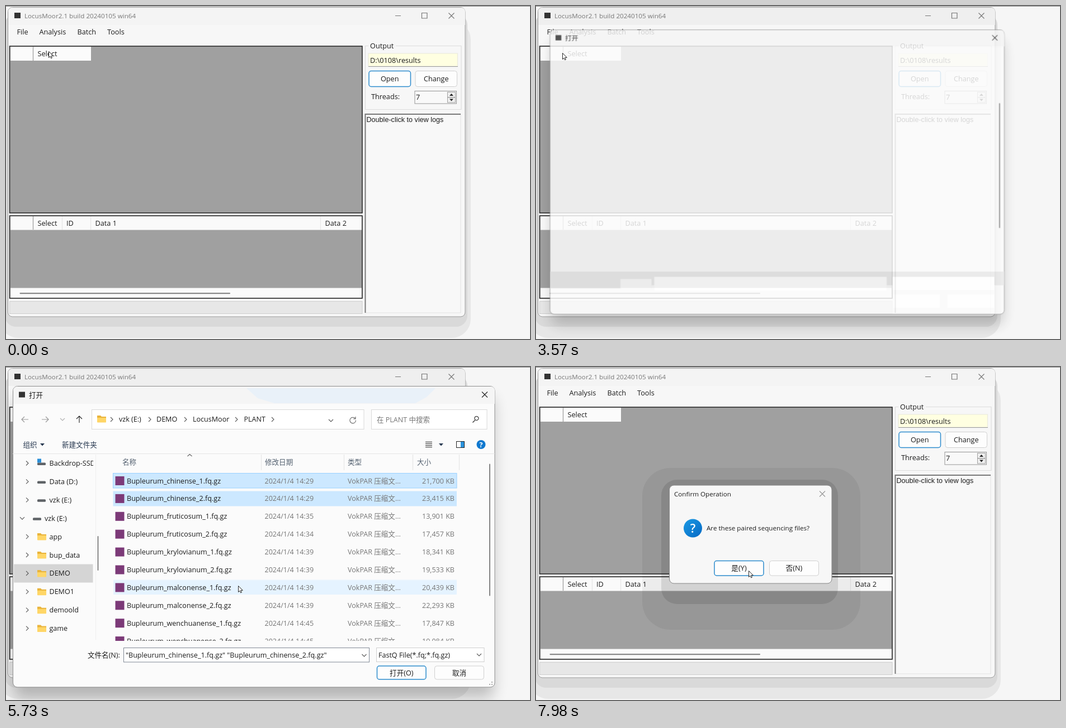
An HTML page for the animation above (8000 ms loop, 937x597 px).

```html
<!DOCTYPE html>
<html lang="en">
<head>
<meta charset="utf-8">
<title>Loading paired sequencing files</title>
<style>
html, body { margin: 0; width: 100%; height: 100%; overflow: hidden; background: #f6f6f6; }
svg { display: block; width: 937px; height: 597px; }
text { font: 12.7px 'Open Sans', 'Noto Sans CJK SC', sans-serif; fill: #1c1c1c; white-space: pre; }
.cap { font-size: 11.65px; }
.log { font: 12.6px 'Liberation Sans', sans-serif; }
#dialog text { font-size: 12.55px; }
#dialog .dim { fill: #767676; }
#dialog .head { fill: #53606f; }
#dialog .tool { fill: #26374f; }
.mid { text-anchor: middle; }
.end { text-anchor: end; }
.line { fill: none; stroke: #222; stroke-width: 1.1; }
.soft { fill: none; stroke: #999; stroke-width: 1.2; }
.anim, .title, .strip, .sel, #cursor, #dialog { animation: 8s step-end -5ms infinite; }
.title { animation-name: title; }
.strip { animation-name: strip; }
#active { animation-name: active; }
#hot { animation-name: hot; }
#menu { animation-name: menu; }
#pick { animation-name: pick; }
#dialog { animation-name: dialog; }
#blank { animation-name: blank; }
#body { animation-name: body; }
#mark { animation-name: mark; }
#caption { animation-name: caption; }
#sel0 { animation-name: sel0; }
#sel1 { animation-name: sel1; }
#hover { animation-name: hover; }
#band { animation-name: band; }
#ring { animation-name: ring; }
#one { animation-name: one; }
#two { animation-name: two; }
#hilite { animation-name: hilite; }
#ok { animation-name: ok; }
#confirm { animation-name: confirm; }
#cursor { animation-name: cursor; }

@keyframes title { 0%, 43%, 91.125% { fill: #777; stroke: #777 } 15.125%, 84.25% { fill: #111; stroke: #111 } }
@keyframes strip { 0%, 91.125% { fill: #f4f4f4 } 15.125% { fill: #f1f5f9 } 43% { fill: #efefef } 84.25% { fill: #f8f9fa } }
@keyframes active { 0%, 43%, 91.125% { opacity: 0 } 15.125%, 84.25% { opacity: 1 } }
@keyframes hot { 0%, 24% { opacity: 0 } 9.75% { opacity: 1 } }
@keyframes menu { 0%, 38.875% { opacity: 0 } 24% { opacity: 1 } }
@keyframes pick {
  0%, 38.875% { opacity: 0; transform: none }
  32.25% { opacity: 1; transform: translateY(-22.5px) }
  35.5% { opacity: 1; transform: none }
}
@keyframes dialog {
  0%, 87.875% { opacity: 0; transform: none }
  43% { opacity: .45; transform: matrix(.925, 0, 0, .925, 17.3, 13.3) }
  44.625% { opacity: .84; transform: matrix(.943, 0, 0, .945, 13.2, 10.1) }
  46.375% { opacity: .97; transform: matrix(.98, 0, 0, .98, 4.6, 3.5) }
  48.125% { opacity: 1; transform: none }
  84.25% { opacity: .85; transform: matrix(.9895, 0, 0, .9895, 4.1, 3.2) }
  86.25% { opacity: .4; transform: matrix(.96, 0, 0, .96, 17, 12) }
}
@keyframes blank { 0% { opacity: 1 } 48.125% { opacity: 0 } }
@keyframes body { 0% { opacity: 0 } 48.125% { opacity: 1 } }
@keyframes mark { 0% { opacity: 1 } 84.25% { opacity: 0 } }
@keyframes caption { 0% { transform: none } 84.25% { transform: translateX(-20px) } }
@keyframes sel0 {
  0% { opacity: 0; fill: #cce8ff; stroke: #99d1ff }
  60% { opacity: 1; fill: #cce8ff; stroke: #99d1ff }
  79.5% { opacity: 1; fill: #d6d6d6; stroke: #d6d6d6 }
}
@keyframes sel1 { 0% { opacity: 0; fill: #cce8ff } 63.375% { opacity: 1; fill: #cce8ff } 79.5% { opacity: 1; fill: #d6d6d6 } }
@keyframes hover {
  0%, 74.875% { opacity: 0; transform: none }
  68% { opacity: 1; transform: translateY(95.7px) }
  69.75% { opacity: 1; transform: translateY(159.5px) }
  71.625% { opacity: 1; transform: translateY(191.4px) }
  73.125% { opacity: 1; transform: translateY(255.2px) }
}
@keyframes band {
  0%, 66.375% { opacity: 0; width: 0; height: 0 }
  60% { opacity: 1; width: 8px; height: 8px }
  61.875% { opacity: 1; width: 20px; height: 20px }
  63.375% { opacity: 1; width: 34px; height: 34px }
  64.875% { opacity: 1; width: 54px; height: 45px }
}
@keyframes ring { 0%, 66.375% { opacity: 0 } 58.375% { opacity: 1 } }
@keyframes one { 0%, 63.375% { opacity: 0 } 60% { opacity: 1 } }
@keyframes two { 0% { opacity: 0 } 63.375% { opacity: 1; fill: #1c1c1c } 79.5% { opacity: 1; fill: #fff } }
@keyframes hilite { 0% { opacity: 0 } 79.5% { opacity: 1 } }
@keyframes ok { 0% { fill: #fdfdfd } 78% { fill: #e0eef9 } 79.5% { fill: #cce4f7 } }
@keyframes confirm {
  0% { opacity: 0; transform: none }
  89.5% { opacity: .8; transform: matrix(.97, 0, 0, .97, 11.5, 9) }
  91.125% { opacity: 1; transform: none }
}
@keyframes cursor {
  0% { transform: translate(76px, 81px) }
  3.375% { transform: translate(70px, 76px) }
  5% { transform: translate(56px, 64px) }
  6.625% { transform: translate(42px, 56px) }
  8.125% { transform: translate(34px, 51px) }
  9.75% { transform: translate(30px, 49px) }
  30.625% { transform: translate(33px, 58px) }
  32.25% { transform: translate(38px, 68px) }
  33.875% { transform: translate(43px, 76px) }
  35.5% { transform: translate(47px, 84px) }
  46.375% { transform: translate(60px, 100px) }
  48.125% { transform: translate(105px, 140px) }
  49.875% { transform: translate(160px, 180px) }
  53.25% { transform: translate(166px, 185px) }
  55% { transform: translate(172px, 192px) }
  56.75% { transform: translate(178px, 198px) }
  58.375% { transform: translate(181px, 201px) }
  60% { transform: translate(189px, 209px) }
  61.875% { transform: translate(201px, 221px) }
  63.375% { transform: translate(215px, 235px) }
  64.875% { transform: translate(235px, 246px) }
  66.375% { transform: translate(245px, 255px) }
  68% { transform: translate(300px, 300px) }
  69.75% { transform: translate(370px, 360px) }
  71.625% { transform: translate(415px, 392px) }
  73.125% { transform: translate(500px, 450px) }
  74.875% { transform: translate(590px, 508px) }
  76.5% { transform: translate(660px, 552px) }
  78% { transform: translate(687px, 546px) }
  86.25% { transform: translate(684px, 545px) }
  87.875% { transform: translate(676px, 538px) }
  89.5% { transform: translate(662px, 528px) }
  91.125% { transform: translate(645px, 519px) }
  92.625% { transform: translate(600px, 492px) }
  94.375% { transform: translate(530px, 450px) }
  96.125% { transform: translate(460px, 407px) }
  98% { transform: translate(402px, 376px) }
  99.75% { transform: translate(380px, 365px) }
}
</style>
</head>
<body>
<svg id="stage" viewBox="0 0 937 597"></svg>
<script>
const rect = (x, y, w, h, fill, more = '') =>
  `<rect x="${x}" y="${y}" width="${w}" height="${h}" fill="${fill}" ${more}/>`;
const text = (x, y, s, cls = '', more = '') => `<text x="${x}" y="${y}" class="${cls}" ${more}>${s}</text>`;
const path = (d, cls = 'line', more = '') => `<path d="${d}" class="${cls}" ${more}/>`;
const solid = (d, fill = '#222') => `<path d="${d}" fill="${fill}"/>`;
const group = (id, inner, cls = 'anim') => `<g id="${id}" class="${cls}">${inner}</g>`;
const cross = (x, y, r, cls) => path(`M${x - r} ${y - r}l${2 * r} ${2 * r}m0 ${-2 * r}l${-2 * r} ${2 * r}`, cls);
const right = (x, y) => path(`M${x - 2} ${y - 4}l4 4-4 4`, 'line', 'stroke="#555" opacity=".75"');
const down = (x, y, cls = 'line') => path(`M${x - 4} ${y - 2}l4 4 4-4`, cls, 'opacity=".75"');
const folder = (x, y) =>
  solid(`M${x} ${y - 6}h6l2 2h8v10h-16z`, '#e9b43c') + rect(x, y - 2, 16, 8.5, '#ffd667', 'rx="1"');
const button = (x, y, w, h, label, main, id = '') =>
  rect(x, y, w, h, '#fdfdfd', `rx="4" stroke="${main ? '#2d8ccd' : '#d0d0d0'}" stroke-width="${main ? 1.5 : 1}" ${id}`) +
  text(x + w / 2, y + h / 2 + 4.5, label, 'mid');
const shadow = (x, y, w, h, o) => rect(x, y, w, h, '#000', `rx="12" opacity="${o}" filter="url(#blur)"`);

const app = 'LocusMoor', drive = 'vzk (E:)', packer = 'VokPAR';

function mainWindow() {
  const items = [['Load References', 73.5], ['Load Sequencing Files', 96], ['Load List', 119],
    ['Download References', 148], ['Export References', 176.5], ['Export Sequencing Files', 199],
    ['Export Current List', 222], ['Refresh Data', 250.5]];
  const menu = rect(10, 35, 226, 22, '#fcfcfc') + rect(15, 61, 219, 201, '#000', 'opacity=".45"') +
    rect(10.5, 36.5, 39.5, 24, '#fbfbfb', 'stroke="#808080"') +
    rect(11.5, 57.5, 219.5, 202, '#fbfbfb', 'stroke="#808080"') + rect(11.2, 56, 38.3, 4, '#fbfbfb') +
    rect(12.5, 81.5, 217, 22, '#b3d7f3', 'stroke="#2f87d0" id="pick" class="anim"') +
    items.map(([s, y]) => text(47.5, y, s)).join('') +
    [129.5, 158.5, 232.5].map(y => path(`M44 ${y}H229`, 'soft', 'style="stroke:#c6c6c6"')).join('') +
    solid('M215 140.5l4.5 4-4.5 4z', '#000');
  return rect(-12, 26, 843, 569, '#e7e7e7', 'rx="34"') + rect(-2, 14, 827, 561, '#d9d9d9', 'rx="20"') +
    group('active', shadow(4, 22, 817, 555, .22)) +
    rect(3.5, 2.5, 817.5, 554.5, '#f7f7f7', 'rx="8" stroke="#9b9b9b"') +
    `<path class="strip" d="M4 34V11q0-8 8-8h801q8 0 8 8v23z"/>` +
    rect(15, 12, 11, 10, '#333') +
    text(33, 21.5, `${app}2.1 build 20240105 win64`, 'cap title', 'stroke-width="0"') +
    `<g class="title" stroke-width="1.2" style="fill-opacity:0"><path d="M696 17.5h10M743.5 12.5h9.5v9.5h-9.5zM791.5 12.5l10 10m0-10l-10 10"/></g>` +
    // upper table
    rect(6.5, 72, 630.5, 299, '#a0a0a0', 'stroke="#222" stroke-width="1.5"') +
    rect(8, 73, 144, 25, '#fbfbfb') + path('M48.5 73v25', 'soft') + text(56.5, 90, 'Select') +
    // lower table
    rect(6.5, 376, 630.5, 148, '#a0a0a0', 'stroke="#222" stroke-width="1.5"') +
    rect(8, 377, 628, 24.5, '#fafafa') + path('M48.5 377v24', 'soft') +
    path('M100.5 377v24M151.5 377v24M562.5 377v24', 'soft', 'style="stroke:#e6e6e6"') +
    text(56.5, 393.5, 'Select') + text(108, 393.5, 'ID') + text(159.5, 393.5, 'Data 1') + text(570.5, 393.5, 'Data 2') +
    rect(8, 505.5, 628, 17.5, '#fafafa') + rect(24.5, 514, 376.5, 2.2, '#888', 'rx="1"') +
    rect(6.5, 529.5, 630.5, 22, '#e7e7e7', 'stroke="#cdcdcd"') +
    // output panel
    path('M648 71.5H642.5V185.5H814V71.5H697', 'soft', 'style="stroke:#dcdcdc"') +
    text(651, 76, 'Output') + rect(648, 85, 159.5, 23, '#ffffe1', 'stroke="#e8e8dc"') +
    path('M648 108.5h160', 'soft') + text(651, 101.5, 'D:\\0108\\results') +
    button(649, 116.5, 74.5, 28, 'Open', true) + button(732, 116.5, 74.5, 28, 'Change') +
    text(653, 167, 'Threads:') + rect(731, 152.5, 74.5, 22.5, '#f9f9f9', 'stroke="#969696"') + text(733, 167.5, '7') +
    rect(789.5, 154.5, 14, 9, '#f0f0f0', 'stroke="#a0a0a0"') + rect(789.5, 164, 14, 9, '#f0f0f0', 'stroke="#a0a0a0"') +
    solid('M793 161l3.5-4 3.5 4zM793 166.5l3.5 4 3.5-4z') +
    // log box
    rect(642, 193, 171, 357, '#f8f8f8', 'stroke="#e2e2e2"') +
    path('M642.5 550V194H813', 'soft', 'style="stroke:#7c7c7c;stroke-width:2"') +
    text(644.5, 208, 'Double-click to view logs', 'log') +
    rect(10.5, 36.5, 39, 20, '#b3d7f3', 'stroke="#2f87d0" id="hot" class="anim"') +
    group('menu', menu) +
    [['File', 19.5], ['Analysis', 59.5], ['Batch', 127.5], ['Tools', 181]].map(([s, x]) => text(x, 51, s)).join('');
}

function sidebar() {
  const names = ['Backdrop-SSD', 'Data (D:)', drive, drive, 'app', 'bup_data', 'DEMO', 'DEMO1', 'demoold', 'game'];
  let out = rect(14, 353.5, 141.5, 33, '#d5d5d5');
  names.forEach((s, i) => {
    const y = 172.5 + 32.9 * i, open = i === 3, x = open ? 48 : 56;
    out += open ? down(29, y, 'line') : right(38, y);
    out += i > 3 ? folder(x, y) : rect(x, y - 1, 15, 4.5, '#5f6367', 'rx="1.5"');
    if (i === 0) out += rect(x, y - 8, 7, 7, '#2b8fd8');
    out += text(open ? 69 : 77.5, y + 4.5, s);
  });
  return `<g clip-path="url(#side)">${out}</g>` + rect(163.5, 303, 2, 62, '#858585', 'rx="1"') +
    path('M160.5 157v332', 'soft', 'style="stroke:#f0f0f0"');
}

function fileList() {
  const files = [['chinense', 29, '21,700', 29, '23,415'], ['fruticosum', 35, '13,901', 34, '17,457'],
    ['krylovianum', 39, '18,341', 39, '19,533'], ['malconense', 39, '20,439', 39, '22,293'],
    ['wenchuanense', 45, '17,847', 45, '19,084']];
  let out = rect(192, 190.5, 614, 26.5, '#e5f3ff', 'id="hover" class="anim"') +
    rect(191.5, 190.5, 614.5, 26.5, '#cce8ff', 'id="sel0" class="sel"') +
    rect(191.5, 222.5, 614.5, 27, '#cce8ff', 'id="sel1" class="sel"');
  for (let i = 0; i < 10; i++) {
    const f = files[i >> 1], k = i % 2, y = 204 + 31.9 * i, b = y + 4.5;
    out += rect(195.5, y - 8, 16, 16, '#7c3a78') + text(216, b, `Bupleurum_${f[0]}_${k + 1}.fq.gz`) +
      text(462.5, b, `2024/1/4 14:${f[1 + 2 * k]}`, 'dim') + text(611, b, `${packer} 压缩文...`, 'dim') +
      text(802, b, `${f[2 + 2 * k]} KB`, 'dim end');
  }
  const heads = [['名称', 208], ['修改日期', 463], ['类型', 611], ['大小', 735]];
  return heads.map(([s, x]) => text(x, 174.5, s, 'head')).join('') +
    path('M456.5 157v28M604.5 157v28M727.5 157v28M810.5 157v28', 'soft', 'style="stroke:#e6e6e6"') +
    path('M324.5 160l4-3.5 4 3.5', 'line', 'opacity=".7"') + `<g clip-path="url(#list)">${out}</g>`;
}

function fileDialog() {
  const first = 'Bupleurum_chinense_1.fq.gz';
  const crumbs = [[drive, 202], ['DEMO', 269], [app, 334], ['PLANT', 425.5]];
  const nav = path('M28 94h12M33 89l-5 5 5 5M64 94h12M71 89l5 5-5 5', 'soft') + down(101, 94, 'soft') +
    path('M131 100V88M126 93l5-5 5 5') +
    rect(153.5, 76.5, 486.5, 35, '#fff', 'stroke="#d9d9d9"') + folder(163, 93) +
    [189, 257, 321, 412, 477].map(x => right(x, 94)).join('') +
    crumbs.map(([s, x]) => text(x, 98, s)).join('') + down(581, 96) +
    path('M624.5 92.5a5.3 5.3 0 1 0 1 3M625 89v4h-4', 'line', 'opacity=".7"') +
    rect(653.5, 76.5, 206.5, 35, '#fff', 'stroke="#d9d9d9"') + text(663, 98.5, '在 PLANT 中搜索', 'dim') +
    path('M834.5 99.5l4-4M838 92a3.5 3.5 0 1 0 7 0a3.5 3.5 0 1 0-7 0') +
    text(30.5, 143.5, '组织', 'tool') + solid('M61 137h8l-4 4.5z', '#26374f') + text(100, 143.5, '新建文件夹', 'tool') +
    path('M750 134.5h12M750 137.5h12M750 140.5h12M750 143.5h12') + solid('M774 137h8l-4 4.5z', '#26374f') +
    rect(805.5, 133.5, 14, 11, '#fff', 'stroke="#222"') + rect(813, 134, 6, 10, '#2b93dc') +
    '<circle cx="849.5" cy="139" r="8" fill="#0f78cf"/>' + text(849.5, 143.5, '?', 'mid', 'style="fill:#fff;font-weight:700"') +
    path('M12 155.5H874', 'soft', 'style="stroke:#e6e6e6"');
  const foot = text(146, 520.5, '文件名(N):') + rect(210.5, 503.5, 439, 25.5, '#fff', 'stroke="#7f8794"') +
    rect(213, 507, 363.5, 18, '#1a78d0', 'id="hilite" class="anim"') +
    text(214, 521, first, 'anim', 'id="one"') +
    text(214, 521, `"${first}" "${first.replace('_1', '_2')}"`, 'anim', 'id="two"') + down(640.5, 517) +
    rect(662.5, 503.5, 192.5, 25, '#fff', 'stroke="#cfcfcf"') + text(666, 520.5, 'FastQ File(*.fq;*.fq.gz)') + down(846, 516) +
    button(663.5, 536, 87.5, 24, '打开(O)', true, 'id="ok" class="anim"') + button(766.5, 536, 88, 24, '取消') +
    rect(868, 564, 2, 2, '#aaa') + rect(868, 568, 2, 2, '#aaa') + rect(864, 568, 2, 2, '#aaa');
  const blank = rect(13, 493, 860.5, 26, '#e9e9e9') + rect(13, 493, 134, 32, '#e9e9e9') +
    rect(146, 507, 59, 18, '#fbfbfb') + rect(210, 503, 441, 26, '#fff') + rect(662, 503, 193, 25, '#fff') +
    rect(664, 536, 88, 26, '#fff') + rect(766, 536, 89, 26, '#fff');
  const glow = solid('M430 38H768l-16 16-20 11H480l-30-9z', '#e9f1f9');
  return group('dialog', shadow(14, 54, 858, 540, .22) +
    rect(12.5, 34.5, 861.5, 539.5, '#fbfbfb', 'rx="8" stroke="#8f8f8f"') +
    solid('M13 66V43q0-8 8-8h845q8 0 8 8v23z', '#f5f5f5') +
    rect(23, 44.5, 11, 10, '#333', 'id="mark" class="anim"') + text(41, 54.5, '打开', 'anim', 'id="caption"') +
    cross(856, 49.5, 5, 'line') + rect(864, 173.5, 2, 237, '#858585', 'rx="1"') +
    group('blank', blank) + group('body', glow + nav + sidebar() + fileList() + foot), '');
}

function confirmBox() {
  return group('confirm', rect(190, 181, 390, 290, '#000', 'rx="50" opacity=".055"') +
    rect(224, 202, 316, 223, '#000', 'rx="28" opacity=".1"') +
    rect(238.5, 212, 290.5, 176, '#f7f7f7', 'rx="8" stroke="#858585"') +
    text(247, 231.5, 'Confirm Operation', 'cap') + cross(512, 227.5, 5, 'soft') +
    '<circle cx="280.5" cy="289" r="16.5" fill="url(#ask)"/>' +
    text(280.5, 296.5, '?', 'mid', 'style="fill:#fff;font-size:21px;font-weight:600"') +
    text(305, 293, 'Are these paired sequencing files?', 'cap') +
    button(319, 347.5, 88, 26.5, '是(Y)', true) + button(417.5, 347.5, 88, 26.5, '否(N)'));
}

document.getElementById('stage').innerHTML =
  `<defs>
    <filter id="blur" x="-10%" y="-10%" width="120%" height="120%"><feGaussianBlur stdDeviation="13"/></filter>
    <clipPath id="side"><rect x="13" y="157" width="143" height="333"/></clipPath>
    <clipPath id="list"><rect x="165" y="186" width="695" height="305"/></clipPath>
    <linearGradient id="ask" x2="1" y2="1"><stop stop-color="#1b9ae4"/><stop offset="1" stop-color="#0669c4"/></linearGradient>
  </defs>` +
  mainWindow() + rect(0, 0, 937, 1, '#8f8f8f') + fileDialog() + confirmBox() +
  rect(181.5, 201.5, 0, 0, '#0078d7', 'fill-opacity=".35" stroke="#0078d7" id="band" class="anim"') +
  group('cursor', '<circle id="ring" class="anim" cx="1" cy="2" r="6.5" fill="#fff" fill-opacity=".6" stroke="#777"/>' +
    '<path d="M.5 .5V11.5L3 9.2 4.7 12.8 6.4 12 4.8 8.4H8.3Z" fill="#fff" stroke="#111" stroke-width=".9"/>', '');
</script>
</body>
</html>
```
